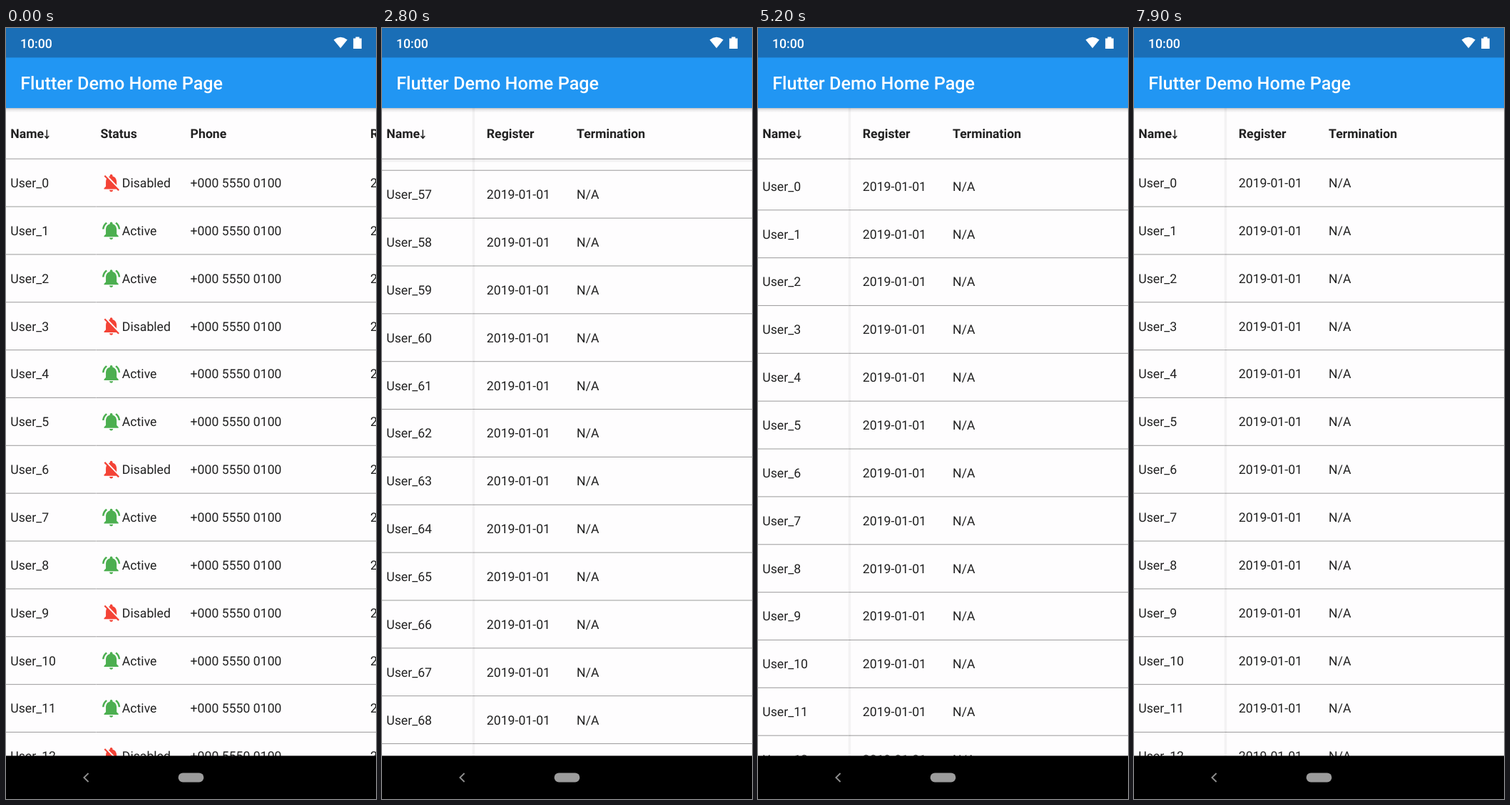
Recreate the animation shown at these times as an HTML page. Size 519x1079 px, loop 8000 ms.

```html
<!DOCTYPE html>
<html lang="en">
<head>
<meta charset="utf-8">
<title>Data table</title>
<style>
  html, body { margin: 0; width: 100%; height: 100%; overflow: hidden; background: #000; }
  svg { display: block; width: 100%; height: 100%; }
  text { font: 400 17.66px Roboto, sans-serif; fill: #212121; text-rendering: geometricPrecision; white-space: pre; }
  .head text { font-weight: 700; }
  .bar text { font-weight: 500; fill: #fff; }
  .bar .title { font-size: 25.23px; }
  .note { fill: #9e9e9e; }
  .line { fill: #000; fill-opacity: .36; }
  .shade { fill: #000; fill-opacity: .045; }
  .glow { fill: #2196f3; }
</style>
</head>
<body>
<svg viewBox="0 0 519 1079" preserveAspectRatio="none">
  <defs>
    <linearGradient id="drop-shade" x1="0" y1="0" x2="0" y2="1">
      <stop offset="0" stop-opacity=".26"/>
      <stop offset=".45" stop-opacity=".08"/>
      <stop offset="1" stop-opacity="0"/>
    </linearGradient>
    <clipPath id="left-body"><rect y="183" width="126.2" height="836"/></clipPath>
    <clipPath id="right-body"><rect x="126.2" y="183" width="393" height="836"/></clipPath>
    <clipPath id="right-pane"><rect x="126.2" y="112" width="393" height="907"/></clipPath>
    <path id="bell-on" fill="#4caf50" d="M7.58 4.08L6.15 2.65C3.75 4.48 2.17 7.3 2.03 10.5h2c.15-2.65 1.51-4.97 3.55-6.42zM19.97 10.5h2c-.15-3.2-1.73-6.02-4.12-7.85l-1.42 1.43c2.02 1.45 3.39 3.77 3.54 6.42zM18 11c0-3.07-1.64-5.64-4.5-6.32V4c0-.83-.67-1.5-1.5-1.5s-1.5.67-1.5 1.5v.68C7.63 5.36 6 7.92 6 11v5l-2 2v1h16v-1l-2-2zM12 22c1.1 0 2-.9 2-2h-4c0 1.1.9 2 2 2z"/>
    <path id="bell-off" fill="#f44336" d="M20 18.69L5.27 3.49 4 4.76l2.8 2.8C6.28 8.56 6 9.73 6 11v5l-2 2v1h13.73l2 2L21 19.72zM12 22c1.1 0 2-.9 2-2h-4c0 1.1.9 2 2 2zM18 14.68V11c0-3.08-1.64-5.64-4.5-6.32V4c0-.83-.67-1.5-1.5-1.5s-1.5.67-1.5 1.5v.68c-.5.12-1 .3-1.44.54z"/>
  </defs>

  <rect y="112" width="519" height="907" fill="#fefdfe"/>

  <g clip-path="url(#right-body)">
    <g id="right-rows"></g>
    <g id="drop">
      <path id="drop-body" fill="#9e9e9e"/>
      <g id="drop-icon" fill="none" stroke="#fff" stroke-width="1.5">
        <path d="M-5 2.6A5.3 5.3 0 0 1 1 -5.2M5 -2.6A5.3 5.3 0 0 1 -1 5.2"/>
        <path fill="#fff" stroke="none" d="M.5 -8.2L4 -5.2L.5 -2.2ZM-.5 8.2L-4 5.2L-.5 2.2Z"/>
      </g>
    </g>
    <path id="spinner" fill="none" stroke="#2196f3" stroke-width="2.5"/>
    <g id="done">
      <path d="M51 220.5L57.5 227L72 212.5" fill="none" stroke="#9e9e9e" stroke-width="2.5"/>
      <text class="note" x="97" y="227">Refresh completed</text>
    </g>
  </g>
  <g clip-path="url(#left-body)"><g id="left-rows"></g></g>

  <g class="head">
    <g clip-path="url(#right-pane)">
      <g id="right-head">
        <text x="132.5" y="154">Status</text>
        <text x="258.6" y="154">Phone</text>
        <text x="510.9" y="154">Register</text>
        <text x="637.1" y="154">Termination</text>
      </g>
    </g>
    <text x="6.3" y="154">Name</text>
    <path d="M57.3 142.5V154M54.4 151L57.3 154.4L60.2 151" fill="none" stroke="#212121" stroke-width="1.5"/>
    <rect class="line" y="182.6" width="519" height="1.1"/>
  </g>
  <rect id="head-shade" class="shade" y="183.6" width="519" height="4"/>
  <rect id="side-shade" class="shade" x="126.6" y="112" width="3.6" height="907"/>

  <g clip-path="url(#right-body)"><ellipse id="end-glow" class="glow"/></g>
  <g clip-path="url(#right-pane)"><ellipse id="side-glow" class="glow"/></g>

  <g class="bar">
    <rect y="111.5" width="519" height="7" fill="url(#drop-shade)"/>
    <rect y="41" width="519" height="71" fill="#2196f3"/>
    <rect width="519" height="41.4" fill="#1a6eb6"/>
    <text x="20" y="27.7">10:00</text>
    <text class="title" x="20.2" y="86.4">Flutter Demo Home Page</text>
    <path d="M459.6 16.4Q469.2 9.2 478.8 16.4L469.2 28.2Z" fill="#fff"/>
    <path d="M487.2 14.4h3.2v-2h5.2v2h3.2v14.6h-11.6z" fill="#fff"/>
  </g>

  <rect y="1018.5" width="519" height="60.5" fill="#000"/>
  <path d="M115.6 1043L109.4 1049L115.6 1055" fill="none" stroke="#8f8f8f" stroke-width="1.9"/>
  <rect x="241.6" y="1042.4" width="35.8" height="13" rx="6.5" fill="#9c9c9c"/>
</svg>

<script>
const LOOP = 8000;
const TOP = 183.1, BOTTOM = 1018.5, RIGHT = 519, SPLIT = 126.15;
const ROW = 66.86, COUNT = 100, POOL = 15;
const MAX_X = 364.05, MAX_Y = COUNT * ROW - (BOTTOM - TOP);
const HEADER = 75.7;      // height kept open while refreshing
const DROP_X = 140.6;

const $ = id => document.getElementById(id);
const clamp = (v, lo = 0, hi = 1) => Math.min(hi, Math.max(lo, v));
const part = (t, from, to) => clamp((t - from) / (to - from));
const easeOut = p => 1 - (1 - p) ** 2;
const easeInOut = p => p * p * (3 - 2 * p);

function set(el, attrs) {
  for (const k in attrs) el.setAttribute(k, attrs[k]);
  return el;
}
function add(parent, tag, attrs, text) {
  const el = set(document.createElementNS("http://www.w3.org/2000/svg", tag), attrs);
  if (text) el.textContent = text;
  return parent.appendChild(el);
}
const show = (el, on) => set(el, { visibility: on ? "visible" : "hidden" });

function makeRow() {
  const y = 39.9;
  const left = add($("left-rows"), "g", {});
  const right = add($("right-rows"), "g", {});
  const name = add(left, "text", { x: 6.3, y });
  add(left, "rect", { class: "line", y: ROW - .5, width: SPLIT, height: 1.1 });
  const icon = add(right, "use", { transform: "translate(132.5 18.4) scale(1.2615)" });
  const status = add(right, "text", { x: 162.8, y });
  add(right, "text", { x: 258.6, y }, "+000 5550 0100");
  add(right, "text", { x: 510.9, y }, "2019-01-01");
  add(right, "text", { x: 637.1, y }, "N/A");
  add(right, "rect", { class: "line", x: SPLIT, y: ROW - .5, width: 760, height: 1.1 });
  return { left, right, name, icon, status, index: -1 };
}
const rows = Array.from({ length: POOL }, makeRow);

const scrollX = t => MAX_X * part(t, 1040, 1260) ** 1.3;

// Distance covered by a swipe: a short drag, then a slowing fling.
function swipe(t, release) {
  if (t < release) return 500 * part(t, release - 140, release) ** 1.6;
  const s = Math.min((t - release) / 1000, 1.2);
  return Math.min(MAX_Y, 500 + 9500 * s - 3200 * s * s);
}
const scrollY = t => clamp(swipe(t, 2400) - swipe(t, 4017), 0, MAX_Y);

// How far the list is pulled below its top edge.
function pull(t) {
  if (t < 6000) return 108 * easeInOut(part(t, 5100, 5900));
  if (t < 7240) return HEADER + (108 - HEADER) * (1 - part(t, 6000, 6310)) ** 2;
  return HEADER * (1 - part(t, 7240, 7800)) ** 3;
}

// Overscroll glow: grows on impact, then recedes for 600 ms.
function glowSize(t, impact, peak) {
  return t < peak ? easeOut(part(t, impact, peak)) : (1 - part(t, peak, peak + 600)) ** 2;
}

function drawRows(sx, sy, off) {
  const first = Math.floor(sy / ROW);
  rows.forEach((row, k) => {
    const i = first + k;
    const y = TOP + i * ROW - sy;
    if (row.index !== i) {
      row.index = i;
      const active = i % 3 > 0;
      row.name.textContent = "User_" + i;
      row.status.textContent = active ? "Active" : "Disabled";
      set(row.icon, { href: active ? "#bell-on" : "#bell-off" });
      show(row.left, i < COUNT);
      show(row.right, i < COUNT);
    }
    set(row.left, { transform: `translate(0 ${y + Math.min(off, HEADER)})` });
    set(row.right, { transform: `translate(${-sx} ${y + off})` });
  });
}

function drawGlows(t, sx) {
  const side = glowSize(t, 1260, 1336);
  const sr = 1359.7, ss = side * .433;
  set($("side-glow"), {
    cx: RIGHT + (sr - 192.7) * ss, cy: 565.3, rx: sr * ss, ry: sr, "fill-opacity": .31 * side
  });
  const end = glowSize(t, 3150, 3210);
  const er = 1135.3;
  set($("end-glow"), {
    cx: SPLIT + 378.45 - sx, cy: BOTTOM + (er - 160.9) * end, rx: er, ry: er * end, "fill-opacity": .31 * end
  });
}

function drawRefresh(t, off) {
  const fade = 1 - part(t, 6000, 6310);
  show($("drop"), off > 0 && fade > 0);
  const cy = Math.min(209, TOP + off - 64.6);
  const len = clamp(off - 57, 0, 33.5);
  const r = 15, tip = r - 7.5 * len / 33.5;
  const y2 = cy + len, mid = cy + len * .5;
  const x = DROP_X;
  set($("drop"), { opacity: fade });
  set($("drop-body"), {
    d: `M${x - r} ${cy}A${r} ${r} 0 0 1 ${x + r} ${cy}C${x + r} ${mid} ${x + tip} ${mid} ${x + tip} ${y2}` +
       `A${tip} ${tip} 0 0 1 ${x - tip} ${y2}C${x - tip} ${mid} ${x - r} ${mid} ${x - r} ${cy}Z`
  });
  set($("drop-icon"), { transform: `translate(${x} ${cy})` });

  show($("spinner"), t >= 6310 && t < 6720);
  const from = (t - 6310) / 160 - 1.57, to = from + .3 + 3.6 * part(t, 6310, 6800);
  const at = a => `${141 + 14.5 * Math.cos(a)} ${221 + 14.5 * Math.sin(a)}`;
  set($("spinner"), { d: `M${at(from)}A14.5 14.5 0 ${to - from > Math.PI ? 1 : 0} 1 ${at(to)}` });

  show($("done"), t >= 6720 && off > 0);
  set($("done"), { transform: `translate(0 ${off - HEADER})` });
}

function draw(t) {
  const sx = scrollX(t), sy = scrollY(t), off = pull(t);
  drawRows(sx, sy, off);
  set($("right-head"), { transform: `translate(${-sx} 0)` });
  show($("side-shade"), sx > 0);
  show($("head-shade"), sy > 0);
  drawGlows(t, sx);
  drawRefresh(t, off);
}

const start = performance.now();
function tick() {
  draw((performance.now() - start) % LOOP);
  requestAnimationFrame(tick);
}
tick();
</script>
</body>
</html>
```
